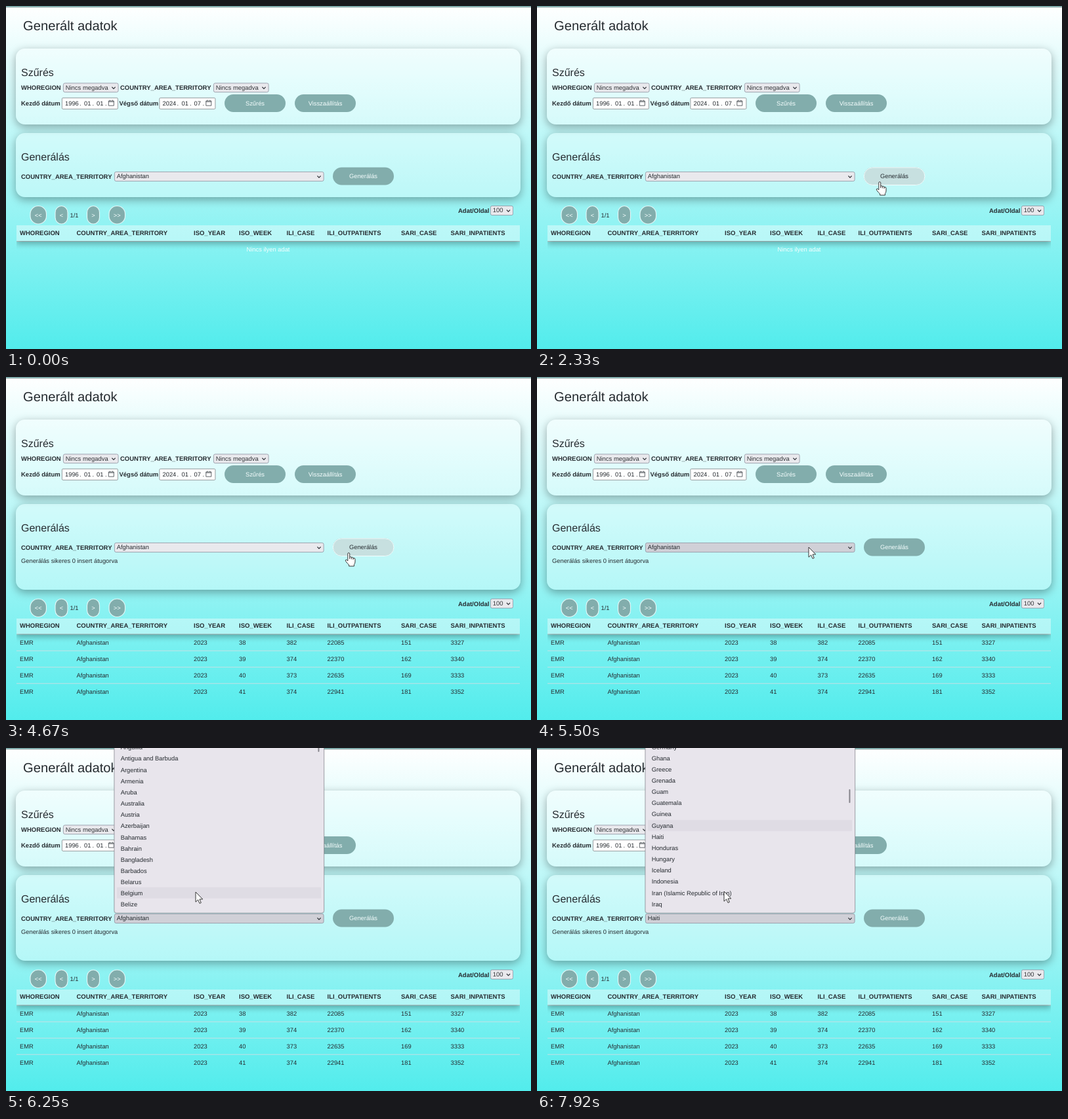
Write an HTML page that moves like this. It is 800x524 px and loops after 8000 ms.

```html
<!DOCTYPE html>
<html lang="hu">
<head>
<meta charset="utf-8">
<title>Generált adatok</title>
<style>
html, body { margin: 0; width: 100%; height: 100%; overflow: hidden; }
#stage { position: relative; width: 800px; height: 524px; overflow: hidden; background: linear-gradient(#fff, #52ecec); }
#stage > * { position: absolute; }
.bar { left: 0; top: 0; width: 800px; height: 2px; background: #83adad; box-shadow: 0 1px 1px #0002; }
.panel { left: 15px; width: 769px; border-radius: 14px; background: #ffffff4d; box-shadow: 0 4px 14px #00000057; }
.filter { top: 65px; height: 116px; }
.generate { top: 194px; height: 97.5px; animation-name: grow; }
.head { left: 16px; top: 335px; width: 767px; height: 24px; background: #ffffff66;
  box-shadow: 0 5px 9px #00000048, 0 1px 0 #c4d2d2; clip-path: inset(0 0 -18px 0); animation-name: drop; }
svg { left: 0; top: 0; font: 9.33px "Liberation Sans", Arial, sans-serif; fill: #262b30; text-rendering: geometricPrecision; }
text { white-space: pre; }
.b { font-weight: bold; font-size: 9.5px; }
.mid { text-anchor: middle; }
.h1 { font-size: 20.2px; }
.h2 { font-size: 16px; }
.opt { font-size: 9.45px; fill: #33363a; }
.white { fill: #f4fdfd; }
.field { fill: #e9e9ed; stroke: #8f8f9d; stroke-width: .8; }
.date { fill: #fff; stroke: #808488; stroke-width: .8; }
.btn { fill: #82adac; }
.pill { fill: #82adac; stroke: #e4f8f8; stroke-width: 1.1; }
.line { fill: none; stroke: #30343a; stroke-width: 1.1; }
.icon { fill: none; stroke: #50555a; stroke-width: .9; }

/* 1% = 80 ms */
.generate, .head, .below, .early, .late, .hover, .press, .combo, .arrow, .hand, .popup, .listA, .listB, .thumb, .markA, .markB, .oldValue, .newValue
  { animation-duration: 8s; animation-iteration-count: infinite; animation-timing-function: step-end; }
.below { animation-name: drop; }
.early { animation-name: early; }
.late { animation-name: late; }
.hover { animation-name: hover; }
.press { animation-name: press; }
.combo { animation-name: combo; }
.arrow { animation-name: travel, arrow; animation-duration: 8s, 8s; animation-timing-function: ease-in-out, step-end; }
.hand { animation-name: travel, hover; animation-duration: 8s, 8s; animation-timing-function: ease-in-out, step-end; }
.popup { animation-name: open; }
.listA, .oldValue { animation-name: before; }
.listB, .newValue { animation-name: after; }
.scroll { animation: scroll 8s infinite cubic-bezier(.2,.6,.3,1); }
.thumb { animation: thumb 8s infinite cubic-bezier(.2,.6,.3,1); }
.markA { animation-name: markA; }
.markB { animation-name: markB; }
@keyframes grow { 53.1%, 100% { height: 131px } }
@keyframes drop { 53.1%, 100% { transform: translateY(33.5px) } }
@keyframes early { 53.1%, 100% { opacity: 0 } }
@keyframes late { 0% { opacity: 0 } 53.1%, 100% { opacity: 1 } }
@keyframes hover { 0% { opacity: 0 } 27.5% { opacity: 1 } 64.8%, 100% { opacity: 0 } }
@keyframes arrow { 0% { opacity: 1 } 27.5% { opacity: 0 } 64.8%, 100% { opacity: 1 } }
@keyframes press { 0% { opacity: 0 } 46.3% { opacity: 1 } 53.1%, 100% { opacity: 0 } }
@keyframes combo { 14% { fill: #d0d0d7 } 26.5% { fill: #e9e9ed } 65.2%, 100% { fill: #d0d0d7 } }
@keyframes open { 0% { opacity: 0 } 70.9%, 100% { opacity: 1 } }
@keyframes before { 87.5%, 100% { opacity: 0 } }
@keyframes after { 0% { opacity: 0 } 87.5%, 100% { opacity: 1 } }
@keyframes markA { 0% { opacity: 0 } 73% { opacity: 1; transform: translateY(17.15px) } 75.5%, 100% { opacity: 1; transform: none } }
@keyframes markB { 0% { transform: translateY(17.15px) } 88.6%, 100% { transform: none } }
@keyframes scroll { 0%, 96% { transform: none } 98.6%, 100% { transform: translateY(-102.9px) } }
@keyframes thumb {
  0%, 87.49% { transform: translateY(-15px) }
  87.5%, 96% { transform: translateY(54px) }
  98.6%, 100% { transform: translateY(63px) }
}
@keyframes travel {
  0%, 6% { transform: translate(810px, 330px) }
  15%, 21.5% { transform: translate(361px, 267px) }
  29%, 63.5% { transform: translate(522px, 268px) }
  67.5%, 70.5% { transform: translate(414px, 260px) }
  77%, 90% { transform: translate(289px, 220px) }
  98%, 100% { transform: translate(285px, 219px) }
}
</style>
</head>
<body>
<div id="stage">
  <div class="bar"></div>
  <div class="panel filter"></div>
  <div class="panel generate"></div>
  <div class="head"></div>
</div>
<script>
const ROW = 17.15;
const text = (x, y, s, cls = '') => `<text x="${x}" y="${y}" class="${cls}">${s.replace(/</g, '&lt;')}</text>`;
const rect = (x, y, w, h, r, cls, extra = '') => `<rect x="${x}" y="${y}" width="${w}" height="${h}" rx="${r}" class="${cls}" ${extra}/>`;
const group = (cls, ...parts) => `<g class="${cls}">${parts.join('')}</g>`;
const path = (d, cls, extra = '') => `<path d="${d}" class="${cls}" ${extra}/>`;

const chevron = (x, y) => path(`M${x - 2.6} ${y - 1.3}l2.6 2.6 2.6-2.6`, 'line');
const select = (x, y, w, h, label, cls = '') =>
  rect(x + .4, y + .4, w - .8, h - .8, 2.4, 'field ' + cls) + text(x + 3.7, y + 10.3, label, 'opt') + chevron(x + w - 7.5, y + h / 2 + .3);
const button = (x, y, label) => rect(x, y, 93, 27, 13.5, 'btn') + text(x + 46.5, y + 16.8, label, 'mid white');
const pill = (x, w, label) => rect(x + .5, 305.5, w - 1, 27.5, Math.min(12, w / 2), 'pill') + text(x + w / 2, 322.6, label, 'mid white');

function dateField(x, year, month, day) {
  const parts = [[5, year], [27, '.'], [34, month], [46.5, '.'], [53, day], [66, '.']];
  const icon = path(`M${x + 71.3} 145h8v7.2h-8zM${x + 71.3} 146.2h8M${x + 73.3} 143.4v1.6M${x + 77.3} 143.4v1.6`, 'icon');
  return rect(x + .4, 140.4, 85, 17, 1.5, 'date') + parts.map(([dx, s]) => text(x + dx, 152, s)).join('') + icon;
}

const columns = [21, 107.5, 286, 355, 427.5, 489.5, 602, 677.5];
const titles = 'WHOREGION COUNTRY_AREA_TERRITORY ISO_YEAR ISO_WEEK ILI_CASE ILI_OUTPATIENTS SARI_CASE SARI_INPATIENTS'.split(' ');
const data = [[38, 382, 22085, 151, 3327], [39, 374, 22370, 162, 3340], [40, 373, 22635, 169, 3333], [41, 374, 22941, 181, 3352]];
const cells = (values, y, cls) => values.map((v, i) => text(columns[i], y, String(v), cls)).join('');
const rows = data.map((d, i) =>
  cells(['EMR', 'Afghanistan', 2023, ...d], 409 + i * 25) +
  (i < 3 ? rect(16, 417.7 + i * 25, 767, 1, 0, '', 'fill="#d6e0e2" fill-opacity=".85"') : '')).join('');

const options = (names, y) => names.split('|').map((s, i) => text(174.7, y + 3.4 + i * ROW, s)).join('');
const mark = cls => rect(169, 212.8, 311, 17, 1, cls, 'fill="#dfdce4"');
const firstNames = 'Anguilla|Antigua and Barbuda|Argentina|Armenia|Aruba|Australia|Austria|Azerbaijan|Bahamas|Bahrain|Bangladesh|Barbados|Belarus|Belgium|Belize';
const laterNames = 'Ethiopia|Fiji|Finland|France|French Guiana|French Polynesia|Georgia|Germany|Ghana|Greece|Grenada|Guam|Guatemala|Guinea|Guyana|Haiti|Honduras|Hungary|Iceland|Indonesia|Iran (Islamic Republic of Iran)|Iraq';

const parts = [
  text(26, 36.8, 'Generált adatok', 'h1'),
  text(23, 106.7, 'Szűrés', 'h2'),
  text(23, 127.7, 'WHOREGION', 'b'), select(87, 117.5, 84.5, 14.5, 'Nincs megadva'),
  text(174, 127.7, 'COUNTRY_AREA_TERRITORY', 'b'), select(316, 117.5, 84.5, 14.5, 'Nincs megadva'),
  text(23, 152, 'Kezdő dátum', 'b'), dateField(85, '1996', '01', '01'),
  text(172.5, 152, 'Végső dátum', 'b'), dateField(233.5, '2024', '01', '07'),
  button(333, 135, 'Szűrés'), button(440, 135, 'Visszaállítás'),

  text(23, 236.3, 'Generálás', 'h2'),
  text(23, 263.5, 'COUNTRY_AREA_TERRITORY', 'b'),
  select(165, 253, 319.5, 15, '', 'combo'),
  text(168.7, 263.4, 'Afghanistan', 'oldValue'), text(168.7, 263.4, 'Haiti', 'newValue'),
  button(498, 246.5, 'Generálás'),
  group('hover',
    rect(498.3, 246.8, 92.6, 26.7, 13.3, '', 'fill="#c7e0e0" stroke="#f2fdfd" stroke-width="1"'),
    text(544.5, 263.3, 'Generálás', 'mid')),
  text(23, 284.4, 'Generálás sikeres 0 insert átugorva', 'late'),

  group('below',
    pill(36.5, 25.5, '<<'), pill(74.5, 20, '<'), text(97.5, 322.6, '1/1'), pill(123, 20, '>'), pill(156.5, 25.5, '>>'),
    text(689, 316, 'Adat/Oldal', 'b'), select(738, 305, 35, 15, '100'),
    cells(titles, 349.7, 'b')),
  text(399.5, 374.7, 'Nincs ilyen adat', 'mid white early'),
  group('late', rows),
  rect(0, 512, 38, 12, 0, 'press', 'fill="#2d2f30"'),

  group('popup',
    rect(164, -20, 321.5, 273, 4, '', 'fill="#000" fill-opacity=".12"'),
    rect(165, -20, 319.5, 272, 3.5, '', 'fill="#e8e5ec" stroke="#9b9aa3" stroke-width=".8"'),
    '<g clip-path="url(#inside)">',
    group('listA', mark('markA'), options(firstNames, 239 - 14 * ROW)),
    group('listB', group('scroll', mark('markB'), options(laterNames, 238.3 - 15 * ROW))),
    '</g>',
    rect(475.4, 0, 2, 21, 1, 'thumb', 'fill="#85848c"')),

  path('M0 0V15.2L3.6 11.9 6 17.4 8.3 16.4 6 11H10.7Z', 'arrow', 'fill="#fff" stroke="#222" stroke-width=".9" stroke-linejoin="round"'),
  group('hand',
    path('M-1.2 13V2.2Q-1.2.6.2.6T1.7 2.2V7.4Q3 5.8 4.3 7.2V8Q5.8 6.6 7 8.2V9Q10 7.8 10 10.5V14Q10 17 8.4 18.5V21H.6V19Q-1.6 17-4.4 13.4-5.2 11.8-4 11.2-2.8 10.8-1.2 13ZM1.7 7.4V10M4.3 8V10.4M7 9V11',
      '', 'fill="#fff" stroke="#222" stroke-width=".9" stroke-linejoin="round"'))
];

document.getElementById('stage').insertAdjacentHTML('beforeend',
  `<svg width="800" height="524"><clipPath id="inside"><rect x="165" y="-20" width="319" height="271.5"/></clipPath>${parts.join('')}</svg>`);
</script>
</body>
</html>
```
